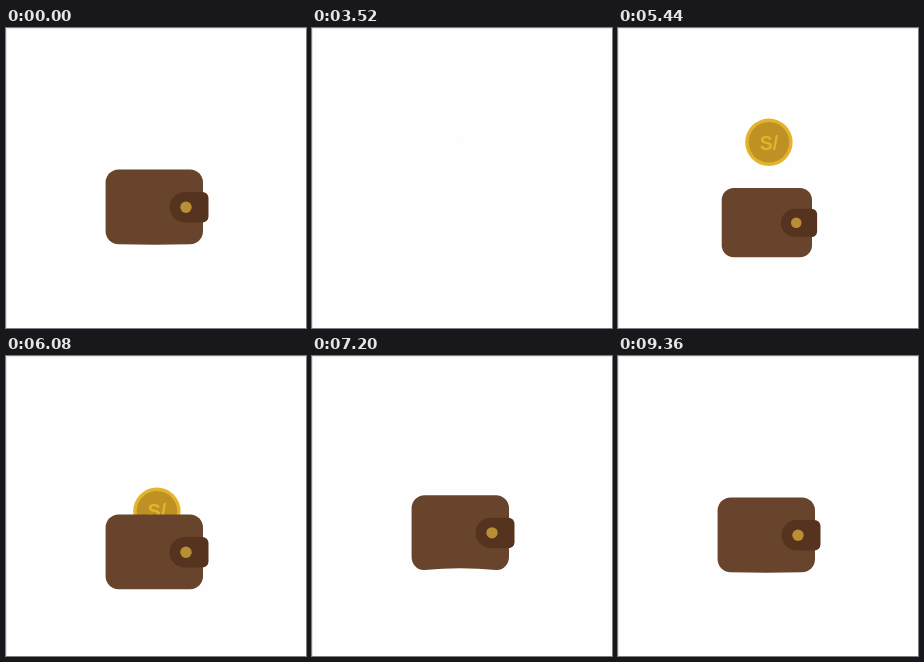
Recreate the animation shown at these times as an HTML page. Size 300 by 300 pixels, loop 9440 ms.

```html
<!DOCTYPE html>
<html lang="en">
<head>
<meta charset="utf-8">
<title>Coin and wallet</title>
<style>
  html, body { margin: 0; width: 100%; height: 100%; overflow: hidden; background: #fefefe; }
  svg { display: block; width: 100vw; height: 100vh; }
  text { font: bold 19.5px "Liberation Sans", Arial, sans-serif; text-anchor: middle; }
</style>
</head>
<body>
<svg viewBox="0 0 300 300">
  <rect width="300" height="300" fill="#fefefe"/>
  <path d="M0 .5H300M.5 0V300" stroke="#e6e6e6"/>
  <g id="coin">
    <circle r="23.7" fill="#e1b42c"/>
    <circle r="20.3" fill="#bf9023"/>
    <text y="7.2" fill="#e1b42c">S/</text>
  </g>
  <g id="wallet">
    <path id="body" fill="#67442b"/>
    <path d="M178.8 164H196.5a6 6 0 0 1 6 6V188.5a6 6 0 0 1-6 6H178.8a15.25 15.25 0 0 1 0-30.5Z" fill="#56331f"/>
    <circle cx="180" cy="179.2" r="5.7" fill="#b98f35"/>
  </g>
</svg>
<script>
const LOOP = 9440, STEP = 80;
const coin = document.getElementById('coin');
const wallet = document.getElementById('wallet');
const body = document.getElementById('body');

const progress = (t, from, to) => Math.min(1, Math.max(0, (t - from) / (to - from)));
const smooth = u => u * u * (3 - 2 * u);

// Eased value through [time, value] pairs.
function track(keys, t) {
  let value = keys[0][1];
  for (let i = 1; i < keys.length; i++) {
    const [start, a] = keys[i - 1], [end, b] = keys[i];
    if (t >= start) value = a + (b - a) * smooth(progress(t, start, end));
  }
  return value;
}

const lift = [[6360, 17], [6520, 19], [6560, 19], [6880, -16.5], [7300, 0]];
const sag = [[6360, 0], [6540, 6.6], [6600, 6.2], [6860, 0], [7060, -5], [7370, 2.5],
  [7610, -1.5], [7850, 1], [8100, -.4], [8400, .4]];

// Rounded body whose lower edge bends by the given depth.
function bodyPath(bend) {
  const left = 99.6, right = 197, top = 141.5, bottom = 216.3, r = 13, k = 7.2;
  const mid = (left + right) / 2;
  const slope = 2 * bend / (mid - left - r);
  const handle = bottom - k * slope;
  return `M${left} ${top + r}a${r} ${r} 0 0 1 ${r} ${-r}H${right - r}a${r} ${r} 0 0 1 ${r} ${r}V${bottom - r}` +
    `C${right} ${bottom - r + k} ${right - r + k} ${handle} ${right - r} ${bottom}` +
    `Q${mid} ${bottom + 2 * bend} ${left + r} ${bottom}` +
    `C${left + r - k} ${handle} ${left} ${bottom - r + k} ${left} ${bottom - r}Z`;
}

function draw(t) {
  const coinScale = smooth(progress(t, 3490, 4150));
  const swing = progress(t, 4150, 4906);
  const angle = 27 * (1 - swing) * Math.sin(swing * Math.PI * 2.4);
  const fall = progress(t, 5500, 6360) ** 2;
  coin.style.display = t >= 3500 && t < 6400 ? '' : 'none';
  coin.setAttribute('transform',
    `translate(150.9 ${114.3 + 90 * fall}) rotate(${angle}) scale(${coinScale})`);

  const resting = t < 720;
  const scale = resting ? 1 : smooth(progress(t, 4906, 5546));
  const y = resting ? 0 : track(lift, t);
  wallet.style.display = resting || t > 4906 ? '' : 'none';
  wallet.setAttribute('transform',
    `translate(156 177.5) scale(${scale}) translate(-156 ${y - 177.5})`);
  body.setAttribute('d', bodyPath(resting ? .4 : track(sag, t)));
}

const begin = performance.now();
function tick() {
  const t = (performance.now() - begin) % LOOP;
  draw(Math.floor(t / STEP) * STEP);
  requestAnimationFrame(tick);
}
tick();
</script>
</body>
</html>
```
